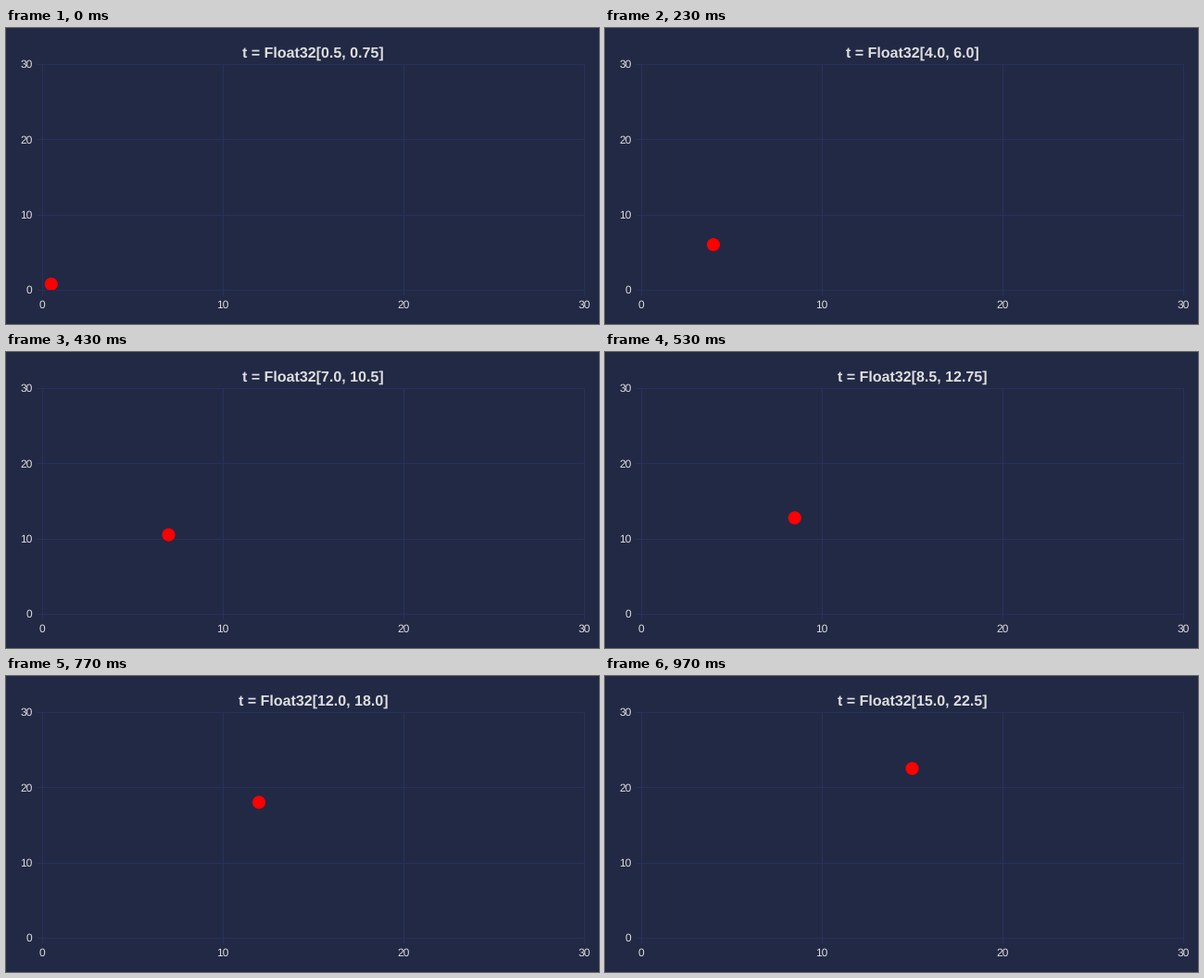
A matplotlib script for the animation above (1.01 s loop, 640x320 px).

```python
import matplotlib.pyplot as plt
from matplotlib.animation import FuncAnimation
from matplotlib.patches import Circle, Rectangle

W, H, DPI = 640, 320, 100
LEFT, RIGHT, TOP, BOTTOM = 39, 624, 39, 283
LIMIT = 30
STEPS = 30
BACKGROUND, GRID, TEXT = "#222945", "#26325a", "#dedede"

plt.rcParams["font.family"] = "Liberation Sans"
plt.rcParams["text.hinting"] = "none"
plt.rcParams["text.hinting_factor"] = 1

fig = plt.figure(figsize=(W / DPI, H / DPI), dpi=DPI, facecolor=BACKGROUND)
ax = fig.add_axes([0, 0, 1, 1])
ax.set_xlim(0, W)
ax.set_ylim(H, 0)
ax.axis("off")


def px(size):
    return size * 72 / DPI


def to_x(value):
    return LEFT + value * (RIGHT - LEFT) / LIMIT


def to_y(value):
    return BOTTOM - value * (BOTTOM - TOP) / LIMIT


def line(xs, ys):
    ax.plot(xs, ys, color=GRID, lw=px(1), solid_capstyle="butt", zorder=1)


def label(x, y, text, size, **style):
    return ax.text(x, y, text, color=TEXT, fontsize=px(size),
                   va="baseline", **style)


TICK = 6
for value in range(0, LIMIT + 1, 10):
    x, y = to_x(value), to_y(value)
    line([x, x], [TOP, BOTTOM + TICK])
    line([LEFT - TICK, RIGHT], [y, y])
    label(x, 303.3, str(value), 12, ha="center")
    label(28.5, y + 4.3, str(value), 12, ha="right")

title = label((LEFT + RIGHT) / 2, 32, "", 16, ha="center", weight="bold")
dot = ax.add_patch(Circle((0, 0), 7.05, color="red", lw=0, zorder=3))
dot.set_clip_path(Rectangle((LEFT, TOP), RIGHT - LEFT, BOTTOM - TOP,
                            transform=ax.transData))


def draw(tick):
    # Thirty positions per second, with starts rounded to 10 ms.
    step = min(int(0.3 * tick + 0.15), STEPS - 1)
    x = 0.5 * (step + 1)
    y = 1.5 * x
    dot.center = to_x(x), to_y(y)
    title.set_text(f"t = Float32[{x}, {y}]")
    return dot, title


anim = FuncAnimation(fig, draw, frames=101, interval=10, repeat=True,
                     repeat_delay=0, blit=False)
plt.show()
```
